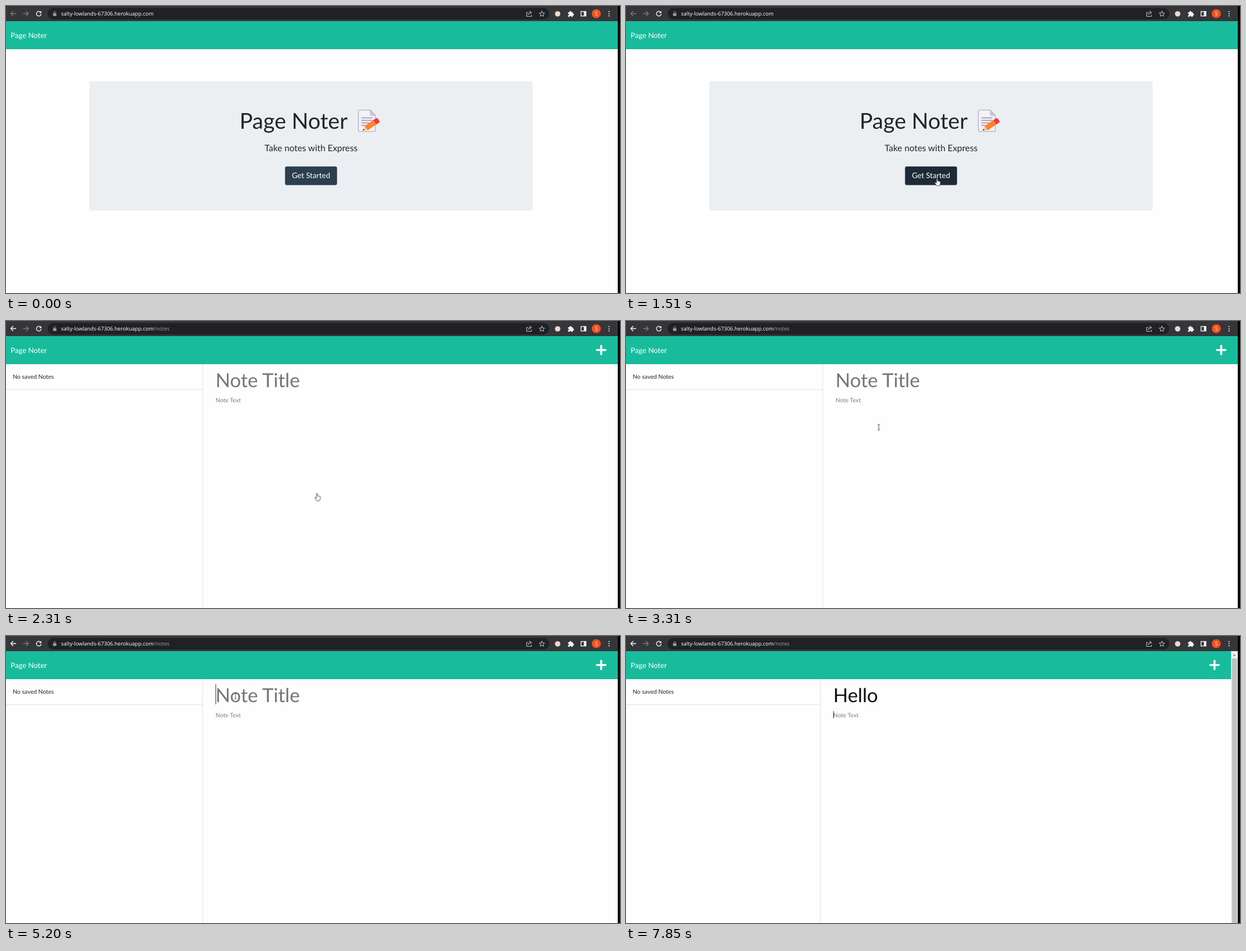
An HTML page that plays this animation: 1093 by 512 pixels, repeating every 8 s.

```html
<!DOCTYPE html>
<html lang="en">
<head>
<meta charset="utf-8">
<title>Page Noter</title>
<style>
  @property --t { syntax: "<number>"; inherits: true; initial-value: 0; }

  html, body { margin: 0; width: 100%; height: 100%; overflow: hidden; background: #fefefe; }
  svg { display: block; width: 1093px; height: 512px; animation: clock 8s linear infinite; }
  text { font-family: Lato, sans-serif; white-space: pre; text-rendering: geometricPrecision; }
  .ui { font-family: "Open Sans", "Noto Sans", sans-serif; font-size: 9.48px; }
  .line { fill: none; stroke-linecap: round; stroke-linejoin: round; }

  /* Shown from --a to --b, in ms of the loop */
  .when {
    --a: 0; --b: 8002;
    --o: clamp(0, min((var(--t) - var(--a) + 1) * 1000, (var(--b) - 1 - var(--t)) * 1000), 1);
    opacity: var(--o);
  }
  tspan.when { fill-opacity: var(--o); }
  .home { --b: 2310; }
  .notes { --a: 2310; }
  .typing { --a: 5470; }

  .move { animation: 8s linear infinite; }
  .arrow { --a: 500; --b: 1310; animation-name: arrow; }
  .hand { --a: 1310; --b: 3040; animation-name: hand; }
  .beam { --a: 3040; --b: 5470; animation-name: beam; }
  .button { animation-name: hover; }
  .ring { animation-name: ring; }
  .column { animation-name: column; animation-timing-function: step-end; }
  .plus { animation-name: plus; animation-timing-function: step-end; }
  .caret { animation-name: caret; animation-timing-function: step-end; }

  @keyframes clock { to { --t: 8000; } }
  @keyframes arrow {
    0%, 6.25% { transform: translate(899px, 506px); animation-timing-function: steps(5); }
    10.4% { transform: translate(695px, 395px); animation-timing-function: steps(6); }
    15.375%, 100% { transform: translate(559.5px, 320px); }
  }
  @keyframes hand {
    0%, 16.375% { transform: translate(557px, 311px); animation-timing-function: steps(3); }
    18.875%, 100% { transform: translate(553.6px, 307.6px); }
  }
  @keyframes beam {
    0%, 38% { transform: translate(534px, 290px); animation-timing-function: steps(4); }
    41.41% { transform: translate(422px, 156px); animation-timing-function: steps(4); }
    44.82% { transform: translate(357px, 83px); animation-timing-function: steps(3); }
    47.375% { transform: translate(408.5px, 104.5px); animation-timing-function: step-end; }
    48.25%, 100% { transform: translate(408.5px, 107.5px); }
  }
  @keyframes hover {
    0%, 16.375% { fill: #2c3e50; }
    18.875%, 23.875% { fill: #1e2b37; }
    25.75%, 100% { fill: #1a252f; }
  }
  @keyframes ring {
    0%, 23.875% { opacity: 0; }
    25.75%, 100% { opacity: 1; }
  }
  @keyframes column {
    0% { transform: none; }
    68.375%, 100% { transform: translateX(-4px); }
  }
  @keyframes plus {
    0% { transform: none; }
    68.375%, 100% { transform: translateX(-12px); }
  }
  @keyframes caret {
    0% { transform: translateX(373px); opacity: 0; }
    51.75% { transform: translateX(373px); opacity: 1; }
    58.375% { transform: translateX(373px); opacity: 0; }
    65% { transform: translateX(373px); opacity: 1; }
    68.375% { transform: translateX(394px); opacity: 1; }
    73.375% { transform: translateX(412px); opacity: 1; }
    78.125% { transform: translateX(421px); opacity: 1; }
    80% { transform: translateX(430px); opacity: 1; }
    85% { transform: translateX(448px); opacity: 1; }
    91.5%, 100% { transform: translateX(448px); opacity: 0; }
  }
</style>
</head>
<body>
<svg viewBox="0 0 1093 512">
  <defs>
    <path id="back" class="line" d="M4.5 0h-9M-.5-4l-4 4 4 4" stroke-width="1.3"/>
    <g id="reload" stroke="#f1f3f4" stroke-width="1.4">
      <path class="line" d="M61.6 10.9a4.2 4.2 0 1 0 .9 3.9"/>
      <path d="M63 8.8v4h-4z" fill="#f1f3f4" stroke="none"/>
    </g>
    <g id="click">
      <circle r="8.3" fill="#e9e43a" fill-opacity=".85"/>
      <circle r="6.3" fill="none" stroke="#bdb92c" stroke-width="2" stroke-opacity=".7"/>
    </g>
  </defs>

  <rect width="1093" height="512" fill="#fefefe"/>

  <!-- Browser bar -->
  <rect width="1089" height="27" fill="#35363a"/>
  <rect x="74" y="3.5" width="893" height="20.5" rx="10.25" fill="#202124"/>
  <use href="#back" x="13" y="13.5" stroke="#7c7d80"/>
  <use class="when" style="--a:2170" href="#back" x="13" y="13.5" stroke="#f1f3f4"/>
  <use href="#back" transform="translate(35.5 13.5) scale(-1 1)" stroke="#7c7d80"/>
  <use class="when" style="--b:2110" href="#reload"/>
  <path class="line when" style="--a:2110;--b:2310" d="M54.5 10l7.5 7.5M62 10l-7.5 7.5" stroke="#f1f3f4" stroke-width="1.4"/>
  <use class="when" style="--a:2310" href="#reload"/>
  <rect x="83.7" y="13" width="6" height="4.8" rx=".8" fill="#9aa0a6"/>
  <path class="line" d="M85 13v-1.4a1.7 1.7 0 0 1 3.4 0V13" stroke="#9aa0a6"/>
  <text class="ui" x="98" y="17.4" fill="#fff">salty-lowlands-67306.herokuapp.com<tspan class="when" style="--a:2170" fill="#9aa0a6">/notes</tspan></text>

  <g class="line" stroke="#c6c9cc">
    <path d="M929 11.5h-2.3v7h8.8v-2.5M929.3 15.6c.4-2.8 2-4.1 4.4-4.1M932 9l3.8 2.6-3.8 2.6"/>
    <path d="M954 9.2l1.4 3.2 3.5.3-2.7 2.3.8 3.4-3-1.8-3 1.8.8-3.4-2.7-2.3 3.5-.3z"/>
  </g>
  <circle cx="982" cy="14" r="4.8" fill="#f2d8cd"/>
  <path d="M1000.5 11h2.7a1.7 1.7 0 1 1 3.3 0h2.5v2.6a1.7 1.7 0 1 1 0 3.3v2.4h-2.6a1.6 1.6 0 0 0-3.2 0h-2.7v-2.6a1.6 1.6 0 0 0 0-3.2z" fill="#f1f3f4"/>
  <rect x="1023.6" y="9.8" width="8.8" height="8" fill="none" stroke="#f1f3f4" stroke-width="1.4"/>
  <path d="M1028.7 9.8h3.7v8h-3.7z" fill="#f1f3f4"/>
  <circle cx="1050.8" cy="13.7" r="8" fill="#f4511e"/>
  <text class="ui" x="1050.8" y="17" text-anchor="middle" fill="#fff">S</text>
  <path class="line" d="M1073.5 10v0M1073.5 13.8v0M1073.5 17.6v0" stroke="#f1f3f4" stroke-width="2.1"/>

  <!-- Page header -->
  <rect y="27" width="1089" height="50" fill="#18bc9c"/>
  <path d="M0 76.5h1089" stroke="#18b395"/>
  <text x="8.3" y="56.6" font-size="13.1" fill="#fff">Page Noter</text>

  <!-- Start page -->
  <g class="when home">
    <rect x="148.5" y="134" width="789" height="230.7" rx="3" fill="#ebeff2"/>
    <text x="512" y="218.8" font-size="39" text-anchor="middle" fill="#212529">Page Noter</text>
    <g stroke-linejoin="round">
      <path d="M629 185.7h19.5l9 9.5v26.6a2 2 0 0 1-2 2h-26.5a1.6 1.6 0 0 1-1.6-1.6v-34.9a1.6 1.6 0 0 1 1.6-1.6z" fill="#f4f1f7" stroke="#b5aebf" stroke-width="1.3"/>
      <path d="M648.5 185.7v7.5a2 2 0 0 0 2 2h7z" fill="#cdc6d6" stroke="#b5aebf" stroke-width=".8"/>
      <path d="M632.5 199.5h20M632.5 204h20M632.5 208.5h15M632.5 213h7" stroke="#998ea4" stroke-width="1.5"/>
      <g transform="translate(635 222) rotate(-34)">
        <path d="M0 0L8-4.7v9.4z" fill="#ffce7c"/>
        <path d="M0 0l2.8-1.6v3.2z" fill="#312d36"/>
        <path d="M7.5-4.7H27v9.4H7.5z" fill="#ff822d"/>
        <path d="M26-4.7h5.5a2.5 2.5 0 0 1 2.5 2.5v4.4a2.5 2.5 0 0 1-2.5 2.5H26z" fill="#f8393b"/>
      </g>
    </g>
    <text x="543.1" y="259.4" font-size="15.8" text-anchor="middle" fill="#212529">Take notes with Express</text>
    <rect class="move ring" x="494.8" y="284.2" width="96.4" height="37.4" rx="4.5" fill="#95a0aa"/>
    <rect class="move button" x="496.7" y="286.2" width="92.6" height="33.4" rx="3.3"/>
    <text x="543" y="307.4" font-size="13.5" text-anchor="middle" fill="#fff">Get Started</text>
    <use class="when" style="--a:1910;--b:2110" href="#click" x="553.5" y="309"/>
  </g>

  <!-- Notes page -->
  <g class="when notes">
    <path class="move plus" d="M1052 51.7h15.2M1059.6 44.2v15" stroke="#fff" stroke-width="3.6" stroke-linecap="round"/>
    <text x="12" y="103.3" font-size="10.5" fill="#212529">No saved Notes</text>
    <g class="move column">
      <path d="M-1 122.5h351M350.2 77v435" fill="none" stroke="#dfe2e5"/>
      <text class="when" style="--a:2310;--b:5470" x="373" y="117.8" font-size="34.4" fill="#757575">Note Title</text>
      <text x="373" y="144.6" font-size="10.6" fill="#7b8087">Note Text</text>
    </g>
    <text x="369" y="117.8" font-size="34.3" fill="#0c0c0c"><tspan class="when typing">H</tspan><tspan class="when" style="--a:5870">e</tspan><tspan class="when" style="--a:6250">l</tspan><tspan class="when" style="--a:6400">l</tspan><tspan class="when" style="--a:6800">o</tspan></text>
    <rect class="move caret" y="86" width="1" height="36" fill="#333"/>
    <rect class="when" style="--a:7850" x="369" y="134" width="1" height="13" fill="#333"/>
    <g class="when typing">
      <path d="M1077 27h12v485h-12z" fill="#f1f1f1"/>
      <path d="M1078.5 40h9.5v472h-9.5z" fill="#c1c1c1"/>
      <path d="M1080.3 35.5l2.7-3 2.7 3z" fill="#8a8a8a"/>
      <path d="M407.7 112.5l2.3-4" stroke="#777" stroke-width=".9"/>
    </g>
    <use class="when" style="--a:4140;--b:4400" href="#click" x="407.7" y="107.7"/>
  </g>

  <!-- Right edge and pointers -->
  <rect x="1089" width="4" height="512" fill="#060606"/>
  <path class="when move arrow" d="M0 0v10l2.3-2.1 1.5 3.3 1.5-.7-1.5-3.2H7z" fill="#fff" stroke="#111" stroke-width=".7"/>
  <path class="when move hand" d="M-.9.9a1 1 0 0 1 2 0v3.5l4 .9a1.5 1.5 0 0 1 1.1 1.5l-.7 4-1 2.2H-.5l-3.4-4.8a1 1 0 0 1 1.5-1.2l1.5 1.4z" fill="#fff" stroke="#222" stroke-width=".8" stroke-linejoin="round"/>
  <path class="when move beam" d="M-2.2-5Q0-5 0-4Q0-5 2.2-5M0-4v8M-2.2 5Q0 5 0 4Q0 5 2.2 5" fill="none" stroke="#333" stroke-width=".9"/>
</svg>
</body>
</html>
```
